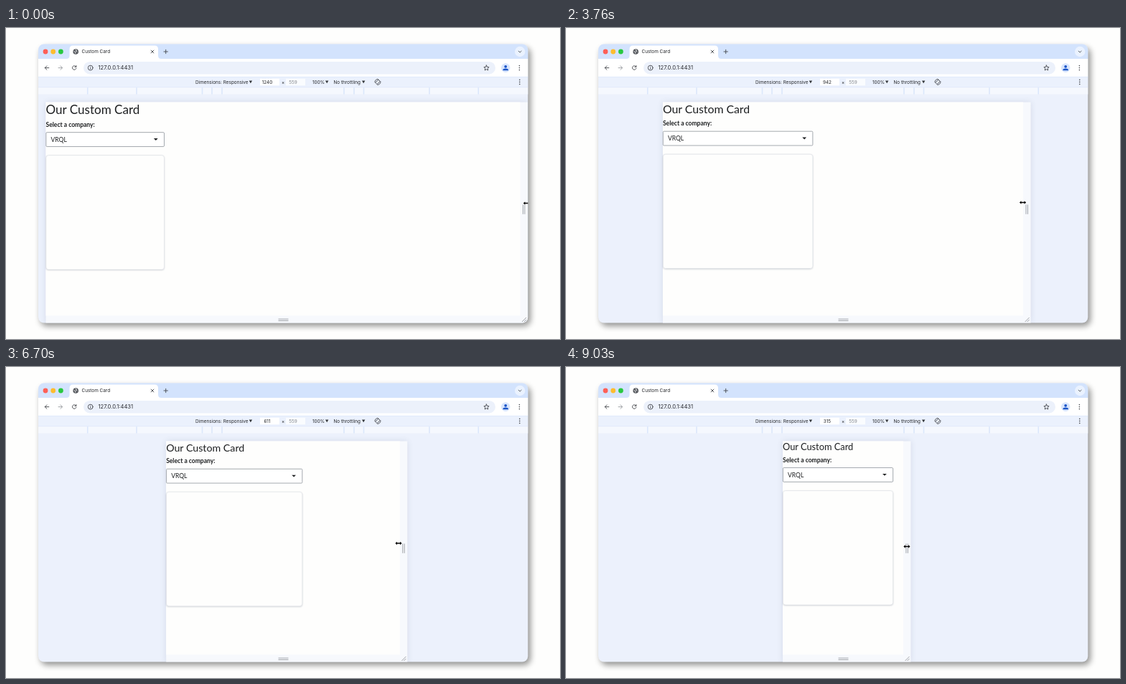
Write an HTML page that moves like this. It is 772 px wide and 434 px high and loops after 9.06 s.

```html
<!DOCTYPE html>
<html lang="en">
<head>
<meta charset="utf-8">
<title>Custom Card</title>
<style>
html, body { margin: 0; width: 100%; height: 100%; overflow: hidden; background: #fefefd; }
svg { display: block; width: 772px; height: 434px; }
text { font: 6.4px Inter, sans-serif; fill: #25272b; }
.mid { text-anchor: middle; }
.line { fill: none; stroke: #44474c; stroke-width: .9; stroke-linecap: round; stroke-linejoin: round; }
.grip { fill: none; stroke: #8c9096; stroke-width: .8; }
.page text { font-family: Lato, sans-serif; font-size: 8.53px; fill: #1d1f21; }
.page .label { font-weight: 700; }
</style>
</head>
<body>
<svg viewBox="0 0 772 434">
  <defs>
    <clipPath id="win"><rect x="45" y="22.5" width="682.3" height="389" rx="8"/></clipPath>
    <filter id="drop" x="-5%" y="-5%" width="110%" height="115%"><feGaussianBlur stdDeviation="4"/></filter>
    <filter id="soft" x="-10%" y="-10%" width="120%" height="120%"><feGaussianBlur stdDeviation="4"/></filter>
    <filter id="low" x="-5%" y="-5%" width="110%" height="110%"><feGaussianBlur stdDeviation=".9"/></filter>
  </defs>

  <rect x="48" y="27" width="683" height="389" rx="9" fill="#000" opacity=".42" filter="url(#drop)"/>

  <g clip-path="url(#win)">
    <rect x="45" y="22" width="683" height="390" fill="#ecf1fc"/>

    <!-- tab strip -->
    <rect x="45" y="22" width="683" height="21" fill="#d3e3fd"/>
    <path d="M84 43q4.500 0 4.500-4.500V29.500q0-5 5-5H207q5 0 5 5V38.500q0 4.500 4.500 4.500z" fill="#fff"/>
    <circle cx="55" cy="33" r="3.4" fill="#fe5f57"/>
    <circle cx="65.700" cy="33" r="3.4" fill="#febc2e"/>
    <circle cx="76.400" cy="33" r="3.4" fill="#28c840"/>
    <circle cx="97.200" cy="33" r="3.800" fill="#53565b"/>
    <path d="M94.600 32.300l2 1.300.2 2M96.800 30l1.500 1.200-1 1 2 1.200" fill="none" stroke="#fff" stroke-width=".9"/>
    <text x="105.500" y="35.300">Custom Card</text>
    <path class="line" d="M202.100 31.100l3.800 3.800m0-3.800l-3.800 3.800M222.700 30.300v5.400M220 33h5.400"/>
    <circle cx="716.200" cy="33" r="7.200" fill="#eaf2ff"/>
    <path class="line" d="M714.300 32.200l1.900 1.900 1.900-1.900"/>

    <!-- address bar -->
    <rect x="45" y="43" width="683" height="25" fill="#fff"/>
    <rect x="108" y="47" width="574" height="17.400" rx="8.700" fill="#ecf1fb"/>
    <path class="line" d="M59.800 55.600h-5.600m2.700-2.700l-2.700 2.700 2.700 2.700"/>
    <path class="line" d="M73 55.600h5.600m-2.700-2.700l2.700 2.700-2.700 2.700" style="stroke:#9a9da2"/>
    <path class="line" d="M97.600 54a2.800 2.800 0 1 0 .3 2.300M97.900 52.500v1.900H96"/>
    <circle class="line" cx="117.700" cy="55.600" r="3.400"/>
    <path class="line" d="M117.700 55.400v1.700M117.700 53.800v.1"/>
    <text x="128.500" y="58.300" style="font-size:7.600px">127.0.0.1:4431</text>
    <path class="line" d="M669.500 52l1.050 2.400 2.550.25-1.900 1.750.55 2.600-2.250-1.350-2.250 1.350.55-2.600-1.900-1.750 2.550-.25z"/>
    <circle cx="696.200" cy="55.600" r="6.300" fill="#d9e6fd"/>
    <circle cx="696.200" cy="53.800" r="1.900" fill="#1b55c8"/>
    <path d="M692.400 59.300v-.8q0-2.100 3.800-2.100t3.800 2.100v.8z" fill="#1b55c8"/>
    <g id="dots" fill="#44474c">
      <circle cx="715.400" cy="52.600" r=".8"/><circle cx="715.400" cy="55.600" r=".8"/><circle cx="715.400" cy="58.600" r=".8"/>
    </g>

    <!-- device toolbar -->
    <rect x="45" y="68" width="683" height="15" fill="#ebf1fd"/>
    <path d="M45 68.300H728M45 82.800H728" stroke="#d5e2f8" stroke-width=".6"/>
    <rect x="354" y="70.800" width="27" height="9.400" fill="#fff"/>
    <rect x="390" y="70.800" width="27" height="9.400" fill="#fafcff"/>
    <text x="264" y="77.800">Dimensions: Responsive</text>
    <text class="mid" id="size" x="364" y="77.800">1240</text>
    <text class="mid" x="386" y="77.800">×</text>
    <text class="mid" x="400" y="77.800" style="fill:#85888d">559</text>
    <text x="427" y="77.800">100%</text>
    <text x="456.500" y="77.800">No throttling</text>
    <path d="M338.700 73.600h4.400l-2.200 3.600zM445 73.600h4.400l-2.200 3.600zM496 73.600h4.400l-2.200 3.600z" fill="#33363a"/>
    <g class="line" transform="translate(518 75.300)">
      <rect x="-1.700" y="-3" width="3.400" height="6" rx=".6" transform="rotate(45)"/>
      <path d="M-4 .5A4 4 0 0 1 .4-4M4-.5A4 4 0 0 1-.4 4"/>
    </g>
    <use href="#dots" transform="translate(.4 19.800)"/>

    <!-- breakpoint bar -->
    <rect x="45" y="83.200" width="683" height="9.300" fill="#f5f8fe"/>
    <g id="marks" fill="#dbe7fb"></g>

    <!-- resizable page -->
    <rect id="halo" y="103.500" height="308" fill="#3c4a66" opacity=".13" filter="url(#soft)"/>
    <rect id="frame" y="103.500" height="309" fill="#f7f9fd"/>
    <rect id="sheet" y="103.500" height="298" fill="#fefefd"/>
    <g class="page" id="page">
      <text id="head">Our Custom Card</text>
      <g id="body">
        <text class="label" y="13.700">Select a company:</text>
        <rect class="col" x=".3" y="21.700" height="19.800" rx="1.300" fill="#fff" stroke="#8d939b" stroke-width=".8"/>
        <text x="7" y="34.700">VRQL</text>
        <path id="caret" d="M-2.900-1.400h5.800L0 1.500z" fill="#1d1f21"/>
        <rect class="col" x=".3" y="54.300" height="159.600" rx="3.600" fill="#3a4660" opacity=".28" filter="url(#low)"/>
        <rect class="col" x=".3" y="53.700" height="159.400" rx="3.600" fill="#fefefd" stroke="#dcdfe4" stroke-width=".6"/>
      </g>
    </g>
    <path class="grip" d="M379.500 406.200h14M379.500 408.500h14"/>
    <g id="edge" class="grip">
      <path d="M4 246.500v13.300M6.400 246.500v13.300M2.600 410l6-6M5.600 410l3-3"/>
    </g>
    <path id="cursor" d="M-4.600 0l2.500-2.300v1.500h4.200v-1.500L4.600 0 2.100 2.300V.8h-4.200v1.500z" fill="#000" stroke="#fff" stroke-width=".6" paint-order="stroke"/>
  </g>
</svg>
<script>
const LOOP = 9060, MID = 386, SCALE = 0.2665 * 2;
const $ = id => document.getElementById(id);
const cols = document.querySelectorAll('.col');

// [time, viewport width]
const widths = [
  [1060, 1240], [1960, 1178], [2060, 1178], [2160, 1176], [3000, 1066],
  [3760, 942], [3930, 920], [4840, 770], [4930, 732], [5200, 703],
  [5730, 703], [6660, 612], [6700, 611], [7360, 504], [7730, 504],
  [8660, 378], [9030, 315]
];
// [time, pointer offset from the page edge] and [time, pointer height]
const offsets = [[1060, 9], [2160, 1.6], [3760, -.5], [4930, 4], [6700, -1.8], [7730, 4.2], [9030, 5]];
const heights = [[1060, 244.5], [2160, 246], [3760, 243.5], [4930, 242.5], [6700, 246], [7730, 249.5], [9030, 250.5]];

// Monotone cubic through the points
function curve(pts) {
  const slope = i => (pts[i + 1][1] - pts[i][1]) / (pts[i + 1][0] - pts[i][0]);
  const last = pts.length - 1;
  const tan = pts.map((p, i) => {
    if (i === 0 || i === last) return slope(i ? i - 1 : 0);
    const a = slope(i - 1), b = slope(i);
    return a * b > 0 ? 2 * a * b / (a + b) : 0;
  });
  return t => {
    if (t <= pts[0][0]) return pts[0][1];
    if (t >= pts[last][0]) return pts[last][1];
    let i = 0;
    while (t >= pts[i + 1][0]) i++;
    const d = pts[i + 1][0] - pts[i][0], u = (t - pts[i][0]) / d, v = 1 - u;
    return v * v * ((1 + 2 * u) * pts[i][1] + u * d * tan[i]) +
           u * u * ((1 + 2 * v) * pts[i + 1][1] - v * d * tan[i + 1]);
  };
}
const widthAt = curve(widths), offsetAt = curve(offsets), heightAt = curve(heights);

// Twelfths taken by the card at each breakpoint
const span = w => w >= 1200 ? 3 : w >= 992 ? 4 : w >= 768 ? 5 : w >= 576 ? 7 : 11;

const set = (el, attrs) => { for (const k in attrs) el.setAttribute(k, attrs[k]); };
const move = (el, x, y) => el.setAttribute('transform', `translate(${x} ${y})`);

$('marks').innerHTML = [85, 99, 112.5, 204, 272.3].flatMap(d => [MID - d, MID + d])
  .map(x => `<rect x="${x - .8}" y="83.2" width="1.6" height="9.3"/>`).join('');

function draw(t) {
  const w = Math.round(widthAt(t));
  const full = w * SCALE, left = MID - full / 2, right = MID + full / 2;
  const font = Math.min(32, 21.2 + .009 * w) * SCALE;
  const col = full * span(w) / 12;

  $('size').textContent = w;
  set($('halo'), { x: left, width: full + 10.5 });
  set($('frame'), { x: left, width: full + 10.5 });
  set($('sheet'), { x: left, width: full });
  move($('page'), left, 103.5);
  $('head').style.fontSize = font + 'px';
  set($('head'), { y: font * .987 });
  move($('body'), 0, font * 1.2);
  cols.forEach(c => set(c, { width: col - .6 }));
  move($('caret'), col - 12, 31.5);
  move($('edge'), right, 0);
  move($('cursor'), right + offsetAt(t), heightAt(t));
}

function tick() {
  draw(performance.now() % LOOP);
  requestAnimationFrame(tick);
}
tick();
</script>
</body>
</html>
```
